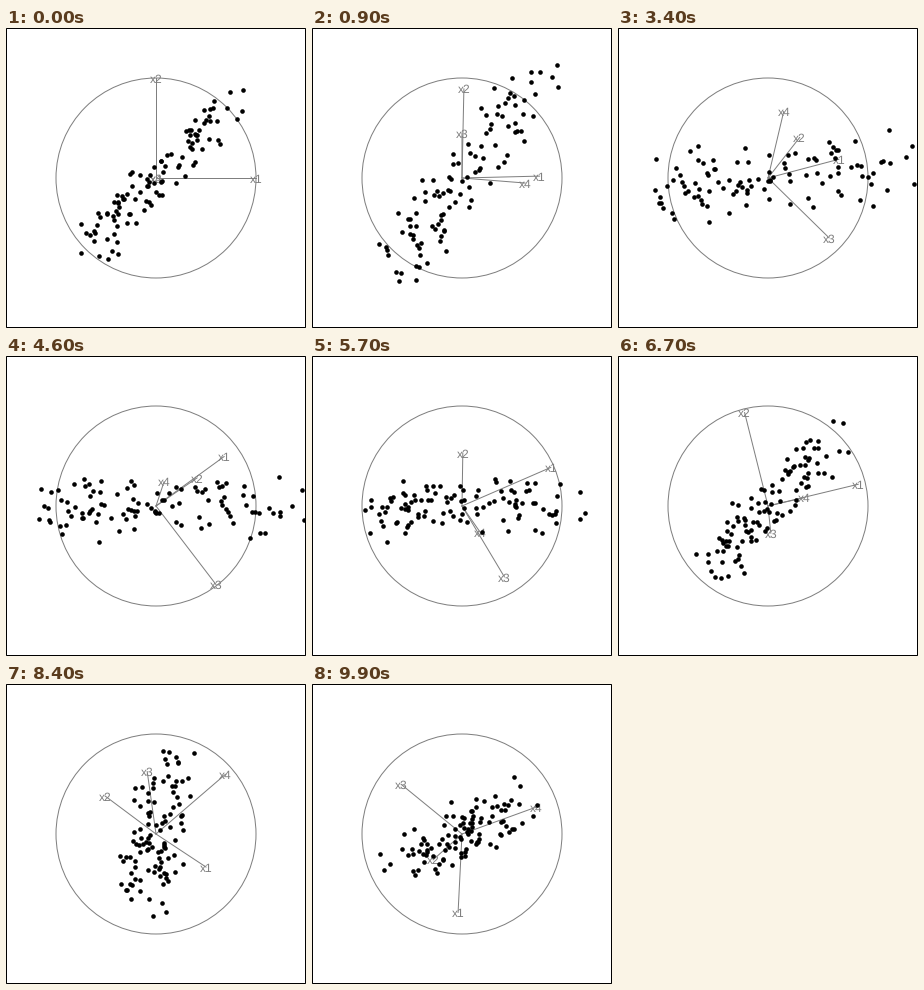
Recreate the animation shown at these times as a matplotlib script. Size 300x300 px, loop 10 s.

```python
import numpy as np
import matplotlib.pyplot as plt
from matplotlib.animation import FuncAnimation
from matplotlib.patches import Circle, Rectangle

SIZE, MID, R = 300, 150, 100
PX = 0.72  # points per pixel at 100 dpi
GREY = "#7f7f7f"
COUNT = 104
STEP = 0.1  # radians turned per frame

plt.rcParams["text.hinting"] = "none"


# ---------- data ----------

def make_cloud():
    """A long, thin 4D cloud, denser towards its low end."""
    rng = np.random.default_rng(11)
    u = (np.arange(COUNT) + rng.random(COUNT)) / COUNT
    along = -0.88 + 1.95 * u ** 1.25
    spread = np.array([20, 20, 26, 36])
    cloud = np.outer(along, [68, 72, 74, 18])
    cloud += rng.uniform(-1, 1, (COUNT, 4)) * spread
    return cloud - cloud.mean(axis=0)


# ---------- tour: geodesics between projection planes ----------

def basis(xs, ys):
    """Nearest orthonormal 4x2 basis to the two given columns."""
    u, _, vt = np.linalg.svd(np.column_stack([xs, ys]), full_matrices=False)
    return u @ vt


def geodesic(a, b):
    """Path p with p(0) = a and p(1) = b; it may run beyond both."""
    u, s, vt = np.linalg.svd(a.T @ b)
    s = np.clip(s, -1, 1)
    tau = np.arccos(s)
    start = a @ u
    normal = (b @ vt.T - start * s) / np.maximum(np.sin(tau), 1e-9)
    spin = u @ vt
    turn = np.arctan2(spin[1, 0], spin[0, 0])

    def at(t):
        c, d = np.cos(t * turn), np.sin(t * turn)
        plane = start * np.cos(t * tau) + normal * np.sin(t * tau)
        return plane @ u.T @ np.array([[c, -d], [d, c]])

    return at


def make_tour():
    home = basis([1, 0, 0, 0], [0, 1, 0, 0])
    first = basis([.776, .019, 0, .63], [.019, .891, .45, -.05])
    via_a = basis([.83, -.05, .31, .445], [-.21, .87, .01, .43])
    via_b = basis([.70, .31, .61, .15], [.18, .40, -.60, .66])
    via_c = basis([.88, .005, .425, .18], [.38, .53, -.71, -.26])
    via_d = basis([.90, -.24, .03, .36], [.21, .93, -.27, .08])
    via_e = basis([.50, -.51, -.09, .69], [-.33, .38, .62, .59])
    via_f = basis([-.04, -.29, -.61, .74], [-.79, -.26, .50, .27])
    views = []

    def leg(path, unit, angle, offset=0.0):
        """Turn steadily through angle; path(1) lies at angle unit."""
        steps = int(np.ceil(angle / STEP - 1e-6))
        for k in range(steps + 1):
            views.append(path((min(k * STEP, angle) - offset) / unit))
        return views[-1]

    leg(geodesic(home, first), 0.825, 0.825)
    second = leg(geodesic(first, via_a), 0.8, 1.45)
    third = leg(geodesic(second, via_b), 0.8, 1.55)
    long_path = geodesic(via_c, via_d)
    leg(geodesic(third, long_path(-STEP)), 1.15, 1.15)
    fifth = leg(long_path, 1.0, 1.45, offset=STEP)
    sixth = leg(geodesic(fifth, via_e), 1.2, 1.35)
    leg(geodesic(sixth, via_f), 1.2, 1.2)
    return views


CLOUD = make_cloud()
VIEWS = make_tour()

# ---------- drawing ----------

fig = plt.figure(figsize=(3, 3), dpi=100, facecolor="white")
ax = fig.add_axes([0, 0, 1, 1])
ax.set_xlim(0, SIZE)
ax.set_ylim(SIZE, 0)
ax.axis("off")

ax.add_patch(Circle((MID, MID), R, fill=False, ec=GREY, lw=PX))
ax.add_patch(Rectangle((0.5, 0.5), SIZE - 1, SIZE - 1, fill=False,
                       ec="black", lw=PX, snap=False))
spokes = [ax.plot([], [], color=GREY, lw=PX, zorder=2)[0] for _ in range(4)]
labels = [ax.text(MID, MID, f"x{i + 1}", color=GREY, size=12 * PX,
                  family="Liberation Sans", ha="center", va="baseline",
                  zorder=3) for i in range(4)]
dots = ax.scatter(CLOUD[:, 0], CLOUD[:, 1], s=(4.6 * PX) ** 2, c="black",
                  linewidths=0, zorder=4)


def to_stage(p):
    return MID + p * [1, -1]


def draw(i):
    view = VIEWS[i]
    for (x, y), spoke, label in zip(to_stage(R * view), spokes, labels):
        spoke.set_data([MID, x], [MID, y])
        label.set_position((x, y + 4.6))
    dots.set_offsets(to_stage(CLOUD @ view))
    return [*spokes, *labels, dots]


anim = FuncAnimation(fig, draw, frames=len(VIEWS), interval=100,
                     repeat=True, repeat_delay=0)
plt.show()
```
